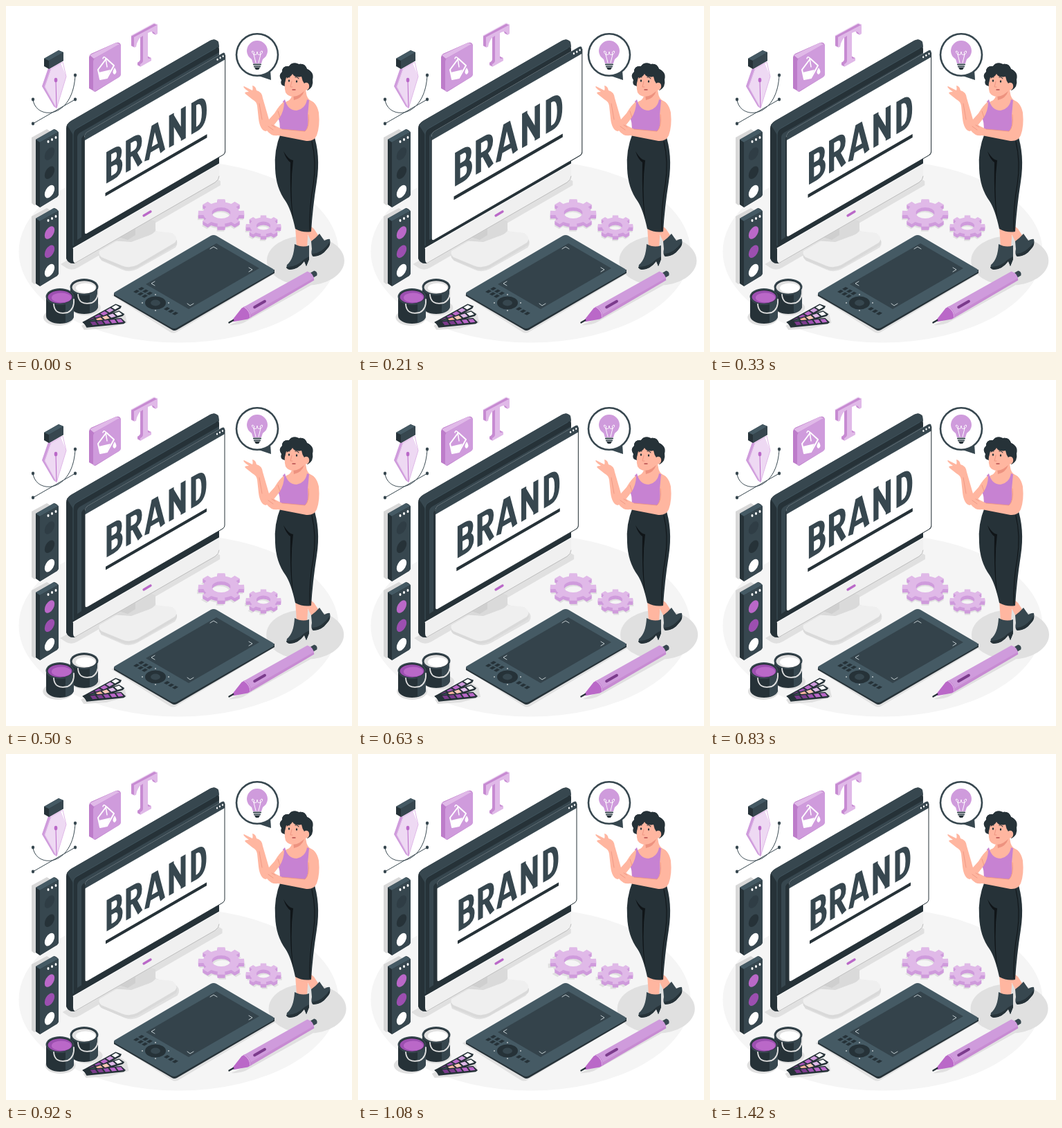
An HTML page with a canvas that plays this animation: 500 px wide and 500 px high, repeating every 1540 ms.

```html
<!DOCTYPE html>
<html lang="en">
<head>
<meta charset="utf-8">
<title>Brand design</title>
<style>
html, body { margin: 0; width: 100%; height: 100%; overflow: hidden; background: #fff; }
canvas { display: block; width: 500px; height: 500px; }
</style>
</head>
<body>
<canvas width="500" height="500"></canvas>
<script>
const canvas = document.querySelector('canvas');
const ctx = canvas.getContext('2d');

const INK = '#263238', SLATE = '#37474f', STEEL = '#455a64';
const PURPLE = '#ba68c8', LILAC = '#cf9bdc', PALE = '#e0b9e8', BLUSH = '#eed9f3';
const SHADE = '#e0e0e0', SKIN = '#ffb6a0', SKIN_DARK = '#ed927f', WHITE = '#fff';
const LOOP = 1540, ISO = -0.577;

function fill(d, color, rule = 'nonzero') {
  ctx.fillStyle = color;
  ctx.fill(new Path2D(d), rule);
}

function line(d, color, width = 1, cap = 'round') {
  ctx.strokeStyle = color;
  ctx.lineWidth = width;
  ctx.lineCap = cap;
  ctx.stroke(new Path2D(d));
}

function oval(x, y, rx, ry, color) {
  ctx.beginPath();
  ctx.ellipse(x, y, rx, ry, 0, 0, Math.PI * 2);
  ctx.fillStyle = color;
  ctx.fill();
}

function within(transform, draw) {
  ctx.save();
  ctx.transform(...transform);
  draw();
  ctx.restore();
}

// Linear keyframes: [time, value] pairs
function track(keys, t) {
  const i = keys.findIndex(k => k[0] > t);
  if (i < 0) return keys[keys.length - 1][1];
  const [t0, v0] = keys[i - 1], [t1, v1] = keys[i];
  return v0 + (v1 - v0) * (t - t0) / (t1 - t0);
}

const BEAT = [[0, 1], [150, 1.1], [450, 1], [600, 1], [750, 1.1], [900, 1]];
const SHAKE = [0, -1, 2, -4, 4, -4, 4, -4, 2, -1, 0].map((v, i) => [i * 150, v]);

function gearPath(r, teeth) {
  const at = (a, k) => `${(r * k * Math.cos(a)).toFixed(2)} ${(r * k * 0.6 * Math.sin(a)).toFixed(2)}`;
  let d = '';
  for (let i = 0; i < teeth; i++) {
    const a = i * 2 * Math.PI / teeth, s = Math.PI / teeth;
    d += `${i ? 'L' : 'M'}${at(a - s, 0.78)}L${at(a - s * 0.5, 0.78)}L${at(a - s * 0.42, 1)}`
      + `L${at(a + s * 0.42, 1)}L${at(a + s * 0.5, 0.78)}`;
  }
  const h = r * 0.4, v = h * 0.6;
  return `${d}ZM${h} 0A${h} ${v} 0 1 0 ${-h} 0A${h} ${v} 0 1 0 ${h} 0Z`;
}

const GEARS = [[311, 299, 33.5], [372, 317.5, 25.5]].map(([x, y, r]) => ({ x, y, path: gearPath(r, 8) }));

function gears() {
  for (const { x, y, path } of GEARS) {
    for (let h = 5; h >= 0; h--) {
      within([1, 0, 0, 1, x, y + h], () => fill(path, h ? LILAC : PALE, 'evenodd'));
    }
  }
}

function shadows() {
  fill('M79 373L300 247L310 253V259L104 378Q96 383 88 379Z', SHADE);
  fill('M136 360L207 322L243 334Q251 341 245 349L190 380Q179 386 168 381L138 368Z', SHADE);
  fill('M153 418L300 334L388 387L247 471Q242 474 237 471Z', SHADE);
  fill('M323 461L350 449L449 392L440 404L343 458Q333 462 323 461Z', SHADE);
  fill('M109 462L158 435L172 445L175 458L146 466L113 468Z', SHADE);
  oval(433, 368, 56, 36, SHADE);
  oval(76, 450, 22, 12, SHADE);
  oval(115, 436, 22, 11, SHADE);
  for (const { x, y, path } of GEARS) {
    within([1, 0, 0, 1, x - 1, y + 7], () => fill(path, SHADE, 'evenodd'));
  }
}

function palette(dy, colors) {
  within([1, 0, 0, 1, 0, dy], () => {
    fill('M37 190L59 178L64 181V274L41 288L37 285Z', '#d8d8d8');
    fill('M43 193L70 178Q76 180 76 185L76 271Q76 275 72 277L49 291L43 287Z', INK);
    fill('M43 193L69 178L76 182L49 197Z', STEEL);
    fill('M49 197L76 182V271Q76 275 72 277L49 291Z', SLATE);
    [[61, 196], [66.5, 193], [72, 190]].forEach(([x, y]) => oval(x, y, 1.5, 2, WHITE));
    colors.forEach((c, i) => {
      within([0.866, -0.5, 0, 1, 63, 213.5 + 27.3 * i], () => oval(0, 0, 8.3, 8.3, c));
    });
  });
}

function monitor() {
  fill('M135 357L190 325L240 332Q251 339 245 346L190 378Q178 384 167 379L138 367Q133 363 135 357Z', '#d9d9d9');
  fill('M135 354L190 322L240 328Q250 335 244 342L190 374Q178 380 167 375L138 363Q133 359 135 354Z', '#efefef');
  fill('M152 339L207 308L216 311V322Q218 326 208 331L181 341Z', '#dadada');
  fill('M160 333L187 317V331L176 338Z', '#cfcfcf');

  fill('M87 177Q87 170 94 166L295 50Q302 46 307 52L308 64V236L99 372Q90 373 87 365Z', INK);
  fill('M88 172L94 166L295 50Q302 46 307 52L308 59L101 178Q97 180 97 186Z', SLATE);
  fill('M97 186Q97 180 102 177L303 61Q308 58 308 65V226L97 348Z', INK);
  line('M97 346V186Q97 180 102 177L303 61', STEEL, 0.8);
  fill('M103 190Q103 186 107 183L308 67V74L111 188Q109 190 109 194V334L103 338Z', SLATE);
  fill('M97 350L308 228V245Q308 251 303 254L104 370Q97 374 97 366Z', '#f0f0f0');
  line('M97 350L308 228', WHITE, 1);
  line('M99 372L302 255Q308 251 308 246', '#bdbdbd', 1);
  line('M199 303L209 297', PURPLE, 3.3);
}

const LETTERS = [
  [0, 'M11 22H4V4H11Q19 4 19 13T11 22Q20 22 20 32T11 42H4V22'],
  [28, 'M4 46V4H12Q20 4 20 14T12 24H4M12 24L21 46'],
  [55.5, 'M3 46L12.8 3.5H16.2L26 46M7 34H22'],
  [90, 'M4 46V0M21 46V0M4 4L21 42'],
  [122, 'M4 4H9Q19 4 19 23T9 42H4Z']
];

function panel(scale) {
  const cx = 215, cy = 198.5;
  within([scale, 0, 0, scale, cx * (1 - scale), cy * (1 - scale)], () => {
    fill('M114 190Q114 185 118 182L312 69Q316 67 316 72V210Q316 213 313 215L118 328Q114 330 114 326Z', WHITE);
    fill('M114 190Q114 185 118 182L312 69Q316 67 316 72V78L114 194.5Z', SLATE);
    line('M316 72V210Q316 213 313 215L118 328Q114 330 114 326V190', INK, 1);
    [305, 309, 313].forEach(x => oval(x, 78 + (x - 305) * ISO, 1.1, 1.5, WHITE));
    within([1, ISO, 0, 1, 145, 211], () => {
      for (const [x, d] of LETTERS) {
        within([1, 0, 0, 1, x, 0], () => line(d, SLATE, 7, 'butt'));
      }
      line('M-1 60.5H145', INK, 4.8, 'butt');
    });
  });
}

function tools() {
  // Vector pen
  line('M39 135C42 165 97 165 100 100M39 170L100 135', SLATE, 1);
  [[39, 135], [100, 100], [100, 135], [39, 170]].forEach(([x, y]) => oval(x, y, 2.2, 2.4, SLATE));
  fill('M61 90L79 82L87 102L73 148L52 116Z', BLUSH);
  fill('M61 90L65 91L56 117L73 148L69 145L52 116Z', LILAC);
  line('M65 91L82 81L87 102L73 148L56 117Z', PALE, 1);
  line('M72 108L73 146', PURPLE, 1);
  oval(72, 107, 2.3, 3.3, PURPLE);
  fill('M55 76L76 64L83 67V79L62 91L55 87Z', INK);
  fill('M55 76L76 64L83 67L62 79Z', STEEL);
  fill('M62 79L83 67V79L62 91Z', SLATE);

  // Paint bucket tile
  fill('M120 74Q120 71 123 69L159 53Q166 52 166 58V98Q166 101 163 103L129 124L120 119Z', '#bd7cca');
  fill('M121 71L159 53L165 55L127 76Z', PALE);
  fill('M126 80Q126 77 129 75L162 56Q166 54 166 58V98Q166 101 163 103L129 123Q126 125 126 121Z', LILAC);
  ctx.lineJoin = 'round';
  line('M133 92L145 76L156 86L146 104L136 106Z', WHITE, 2);
  line('M140 76Q141 72 144 75L146 88', WHITE, 1.5);
  fill('M134 96L151 92L146 104L136 106Z', WHITE);
  fill('M157 89Q162 96 157 99Q152 97 157 89Z', WHITE);
  ctx.lineJoin = 'miter';

  // Serif T
  const serif = 'M185 45L219 27V40L216 42Q214 34 205 39V75Q206 77 210 75V79L194 88V84Q198 82 198 79V43Q190 47 188 59L185 60Z';
  for (let i = 5; i >= 0; i--) {
    within([1, 0, 0, 1, -i * 0.8, -i * 0.45], () => fill(serif, i ? '#c78bd2' : PALE));
  }
  line('M181 43L214 25L219 27', BLUSH, 1.2);
}

function bubble() {
  fill('M365 101L383 107L382 92Z', SLATE);
  oval(363, 70.5, 31.3, 31.6, SLATE);
  oval(363, 70.5, 28.7, 29, WHITE);
  fill('M348 65A15 15 0 0 1 378 65Q378 72 371 77L369 83H357L355 77Q348 72 348 65Z', LILAC);
  line('M361 82L358 70M365 82L368 70M358 70Q354 66 356 65Q360 66 358 70Q363 72 363 66Q363 72 368 70Q366 66 370 65Q372 67 368 70', WHITE, 1);
  line('M358 84.5H368M359 87.5H367', SLATE, 2.2);
  fill('M359 89H367L365 92H361Z', INK);
}

function can(x, y, height, paint, sheen) {
  fill(`M${x - 20} ${y}V${y + height}A20 11 0 0 0 ${x + 20} ${y + height}V${y}Z`, INK);
  fill(`M${x + 8} ${y + 10}V${y + height + 10}Q${x + 20} ${y + height + 7} ${x + 20} ${y + height}V${y}Z`, SLATE);
  oval(x, y, 20.5, 12, SLATE);
  oval(x, y, 18.5, 10.3, INK);
  oval(x, y + 0.5, 17.5, 9.2, paint);
  oval(x + 2, y + 1.5, 14, 7, sheen);
  line(`M${x - 9} ${y + 11}Q${x - 8} ${y + 27} ${x + 11} ${y + 23}Q${x + 21} ${y + 18} ${x + 20} ${y + 4}`, '#e0e0e0', 1.8);
}

function swatches() {
  const strips = [[-0.5, ['#7b3b8c', '#9c4fb0', PURPLE, LILAC, WHITE]],
    [-0.3, [STEEL, '#ffb6a0', '#ffc9b8', PALE, WHITE]],
    [-0.1, ['#7b3b8c', '#7b3b8c', '#9c4fb0', PURPLE, PURPLE]]];
  for (const [angle, colors] of strips) {
    ctx.save();
    ctx.translate(113, 460);
    ctx.rotate(angle);
    fill('M-1 -4H54L60 3L57 5H3Z', INK);
    colors.forEach((c, i) => fill(`M${9 + i * 9.4} -2.5h7l3 5h-7Z`, c));
    ctx.restore();
  }
}

function tablet() {
  fill('M156 415V419L240 468Q243 470 247 468L388 386V381Z', INK);
  fill('M158 413L296 332Q300 330 304 332L386 380Q389 383 386 385L247 465Q243 467 239 465L158 418Q154 415 158 413Z', STEEL);
  fill('M202 402L304 343L366 379L264 438Z', '#34434b');
  line('M295 351L300 348L305 351M351 378L356 381L351 384M215 398L210 401L215 404M262 430L266 433L271 430', '#cfd8dc', 0.9);
  oval(216, 429, 15, 9.5, INK);
  oval(216, 429, 7, 4.4, SLATE);
  [[216, 417], [235, 429], [197, 429], [216, 440]].forEach(([x, y]) => oval(x, y, 0.9, 0.7, WHITE));
  for (let i = 0; i < 3; i++) {
    const dx = i * 6, dy = i * 3.4;
    fill(`M${184 + dx} ${413 + dy}l5 -3l4 2l-5 3Z`, INK);
    fill(`M${191 + dx} ${409 + dy}l5 -3l4 2l-5 3Z`, INK);
    fill(`M${228 + dx} ${438 + dy}l5 -3l4 2l-5 3Z`, INK);
  }
}

function stylus() {
  ctx.save();
  ctx.translate(321.5, 458);
  ctx.rotate(-0.52);
  fill('M139 -4H145Q149 0 145 4H139Z', SLATE);
  fill('M30 -9L136 -8Q143 0 138 8L30 9Z', LILAC);
  fill('M30 5L139 5L138 8L30 9Z', '#c78bd2');
  fill('M7 -1L27 -9H32Q37 0 32 9H27L7 2Z', PURPLE);
  line('M31 -9Q36 0 31 9', PALE, 1);
  line('M1 0L8 0', INK, 2.2);
  line('M44 -1H61', '#7b3b8c', 4);
  ctx.restore();
}

function woman() {
  // Back leg and boots
  fill('M433 312L445 322L453 334L443 344L434 326Z', SKIN);
  fill('M441 340Q448 335 453 329L460 339Q466 336 468 337Q470 345 464 351Q456 362 444 362Q440 360 442 351Z', SLATE);
  fill('M442 358Q456 358 468 341Q469 346 464 351Q456 362 444 362Z', INK);
  fill('M418 318L437 321L435 349H420Z', SKIN);
  fill('M417 344Q428 350 438 346V366L434 376L431 368Q422 381 410 381Q404 379 406 374Q416 366 417 344Z', SLATE);
  fill('M405 377Q419 378 431 366L438 362V366L434 376L431 369Q422 381 410 381Q405 380 405 377Z', INK);

  // Trousers
  fill('M397 184Q387 208 389 235Q390 263 404 282Q412 294 418 322Q429 328 441 326Q443 292 449 254Q455 215 444 184Z', INK);
  fill('M401 210Q409 223 415 223Q410 262 415 308Q410 285 411 226Q405 222 401 210Z', '#101518');
  line('M442 196Q449 225 444 258Q438 290 439 324', '#0f1417', 1);

  // Neck, torso and top
  fill('M414 122L433 116Q433 132 439 136Q449 140 451 153L444 180L396 178L395 154L405 138Q414 136 414 122Z', SKIN);
  fill('M415 128Q423 130 431 123Q427 134 416 136Z', SKIN_DARK);
  fill('M403 135Q407 151 420 151Q433 148 435 135L440 137Q434 156 443 166L443 183Q420 190 395 181Q398 169 391 158Q402 149 400 138Z', '#c782d2');

  // Raised arm
  fill('M402 138Q395 143 388 155L380 164L371 133Q370 124 362 122Q361 116 356 115Q357 120 356 122L344 116Q341 117 351 124Q343 124 346 127L356 135Q362 138 363 144L365 163Q367 179 375 181Q383 179 395 162Q402 152 402 138Z', SKIN);
  line('M366 141L370 164M393 152L396 161', SKIN_DARK, 0.8);

  // Folded arm
  fill('M438 136Q449 139 452 154Q454 174 449 187Q445 196 434 195L393 187Q384 189 377 180L373 169Q379 163 389 173L399 178L432 181Q438 176 436 158Z', SKIN);
  line('M437 157Q439 175 432 181L399 178M384 172L389 175M379 174L386 179', SKIN_DARK, 0.8);

  // Head and hair
  fill('M403 116Q395 114 398 107Q393 100 399 95Q399 86 409 87Q414 80 423 84Q432 82 435 91Q446 96 443 106Q445 117 436 122L420 110Z', INK);
  fill('M405 98Q401 116 404 125Q409 133 420 130Q430 127 433 115L430 94Z', SKIN);
  oval(434, 116, 4.2, 5.5, SKIN);
  fill('M403 111Q394 104 399 95Q399 86 409 87Q414 80 423 84Q432 82 435 91Q446 96 442 108Q441 112 437 111Q433 109 431 112Q428 108 427 102Q417 104 414 98Q411 104 405 103Z', INK);
  oval(409, 108, 1.2, 1.8, INK);
  oval(420, 109, 1.2, 1.8, INK);
  line('M406 104Q408 102 410 103M418 103Q421 102 423 105', INK, 1.1);
  line('M413 109L411 117L414 117', SKIN_DARK, 0.9);
  line('M414 121L418 121', '#b54c4c', 1.3);
}

function draw(t) {
  ctx.clearRect(0, 0, 500, 500);
  oval(249.5, 355, 231, 131.5, '#f5f5f5');
  within([1, 0, 0, 1, track(SHAKE, t), 0], shadows);
  palette(0, ['#2f3d45', INK, WHITE]);
  palette(114, [PURPLE, '#9c4fb0', WHITE]);
  monitor();
  panel(track(BEAT, t));
  tools();
  bubble();
  gears();
  can(113, 406, 28, '#e0e0e0', WHITE);
  can(78, 420, 28, '#9c4fb0', PURPLE);
  swatches();
  tablet();
  stylus();
  woman();
}

// The motion steps at 24 per second and rests at the end of each loop
const start = performance.now();
function tick(now) {
  const t = Math.max(0, now - start) % LOOP;
  const step = Math.min(34, Math.floor((t + 5) * 0.024));
  draw(step / 0.024 + 10);
  requestAnimationFrame(tick);
}
tick(start);
</script>
</body>
</html>
```
